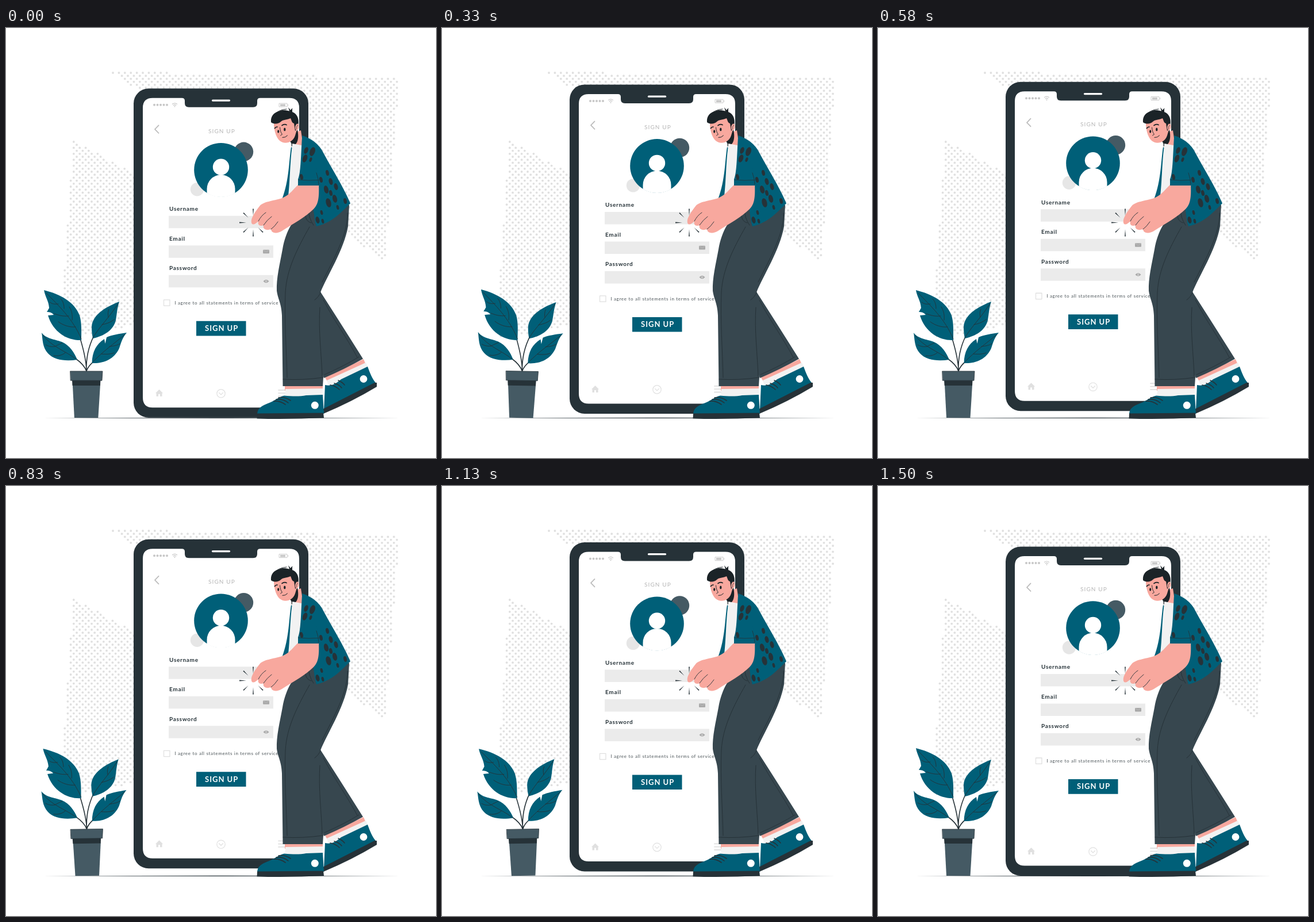
An HTML page with a canvas that plays this animation: 748x748 px, repeating every 1540 ms.

```html
<!DOCTYPE html>
<html lang="en">
<head>
<meta charset="utf-8">
<title>Sign up</title>
<style>
html, body { margin: 0; width: 100%; height: 100%; overflow: hidden; background: #fff; }
canvas { display: block; width: 100vw; height: 100vh; }
</style>
</head>
<body>
<canvas id="stage" width="748" height="748"></canvas>
<script>
const ctx = document.getElementById('stage').getContext('2d');
const LOOP = 1540, STEPS = 37;
const TEAL = '#005f78', DARK = '#263238', SLATE = '#455a64', PANTS = '#37474f',
  SKIN = '#f8a89e', INK = '#1b2327', PALE = '#ebebeb', GREY = '#c7c7c7', SILVER = '#e0e0e0';

function fill(path, color) {
  ctx.fillStyle = color;
  ctx.fill(new Path2D(path));
}
function line(path, color, width = 1) {
  ctx.strokeStyle = color;
  ctx.lineWidth = width;
  ctx.lineCap = ctx.lineJoin = 'round';
  ctx.stroke(new Path2D(path));
}
function oval(x, y, rx, ry, color, turn = 0) {
  ctx.fillStyle = color;
  ctx.beginPath();
  ctx.ellipse(x, y, rx, ry, turn, 0, 2 * Math.PI);
  ctx.fill();
}
const disc = (x, y, r, color) => oval(x, y, r, r, color);
function box(x, y, w, h, color, r = 0) {
  ctx.fillStyle = color;
  ctx.beginPath();
  ctx.roundRect(x, y, w, h, r);
  ctx.fill();
}
function text(str, x, y, font, color, spacing) {
  ctx.font = font + ' Lato, sans-serif';
  ctx.letterSpacing = spacing + 'px';
  ctx.fillStyle = color;
  ctx.fillText(str, x, y);
}

function halftone(shape, x0, y0) {
  const area = new Path2D(shape), gap = 10.4;
  for (let row = 0; row < 100; row++) {
    const y = y0 + row * gap / 2;
    for (let x = x0 + (row % 2) * gap / 2; x < 700; x += gap)
      if (ctx.isPointInPath(area, x, y)) disc(x, y, 1.9, SILVER);
  }
}

function backdrop() {
  halftone('M182 76 L684 86 L660 406 Z', 186, 78);
  halftone('M117 194 L240 264 V514 L94 541 Z', 97, 198);
  fill('M64 678.5 Q374 677.2 686 678.5 Q374 679.3 64 678.5', DARK);
}

function field(label, y, icon) {
  text(label, 284, y - 8.5, '700 10px', DARK, 0.7);
  box(283, y, 182, 21.5, PALE);
  if (icon) icon(452.5, y + 10.7);
}
function mailIcon(x, y) {
  box(x - 5.5, y - 3.3, 11, 6.6, '#a9a9a9', 1);
  line(`M${x - 5} ${y - 2.5} L${x} ${y + 0.5} L${x + 5} ${y - 2.5}`, '#c2c2c2', 0.7);
}
function eyeIcon(x, y) {
  fill(`M${x - 5} ${y} Q${x} ${y - 5.5} ${x + 5} ${y} Q${x} ${y + 5.5} ${x - 5} ${y}`, '#a6a6a6');
  disc(x, y, 1.7, PALE);
  disc(x, y, 0.9, '#999');
}

function statusBar() {
  for (let i = 0; i < 5; i++) disc(258 + i * 5.5, 134, 2, GREY);
  line('M289.5 132.5 Q293.5 129.5 297.5 132.5 M291.2 134.7 Q293.5 133 295.8 134.7', GREY, 1.2);
  disc(293.5, 136.8, 1, GREY);
  line('M475.5 131.3 H489 V137.3 H475.5 Z M490.7 133.3 V135.3', GREY, 0.9);
  box(477, 132.6, 9, 3.6, GREY);
}

function avatar() {
  disc(332.5, 281, 11.7, '#e6e6e6');
  disc(413.5, 215.5, 16.7, SLATE);
  disc(374, 247, 46.8, TEAL);
  ctx.save();
  ctx.beginPath();
  ctx.arc(374, 247, 47.2, 0, 2 * Math.PI);
  ctx.clip();
  disc(374, 242, 14.2, '#fff');
  fill('M349.5 295 V280 A24.5 24.5 0 0 1 398.5 280 V295 Z', '#fff');
  ctx.restore();
}

function phone() {
  box(222, 105.5, 304, 572.5, DARK, 26);
  fill('M255 122 H306 Q311 122 311 127 V131 Q311 138 318 138 H430 Q437 138 437 131 V127 ' +
    'Q437 122 442 122 H493 Q510 122 510 139 V643 Q510 660.5 493 660.5 H255 Q238 660.5 238 643 V139 Q238 122 255 122', '#fff');
  line('M359.5 126.3 H388.5', '#fff', 3.2);
  statusBar();
  line('M265.5 169.5 L259 176.3 L265.5 183', '#bdbdbd', 1.8);
  text('SIGN UP', 352, 182.7, '400 10px', '#b5b5b5', 1.1);
  avatar();
  field('Username', 327, null);
  field('Email', 378.5, mailIcon);
  field('Password', 430, eyeIcon);
  line('M274.5 473 H285 V483.3 H274.5 Z', SILVER, 1.3);
  text('I agree to all statements in terms of service', 293.3, 481, '400 8px', '#4a5357', 0.68);
  box(331, 510, 86.5, 25.7, TEAL);
  text('SIGN UP', 346, 527.3, '700 13px', '#fff', 1);
  fill('M260 635.5 L266.5 629 L273 635.5 H271.5 V641 H268 V637 H265 V641 H261.5 V635.5 Z', SILVER);
  line('M366.8 636 a7.2 7.2 0 1 0 14.4 0 a7.2 7.2 0 1 0 -14.4 0 M370.5 634.5 L374 638 L377.5 634.5', SILVER, 1.2);
  line('M474 630 H486 M474 635.3 H486 M474 640.6 H486', SILVER, 1.8);
}

function plant() {
  line('M140 597 C140 580 135 560 129 540 M140 597 C139 575 143 555 153 535 ' +
    'M140 597 C137 588 131 582 121 575 M140 597 C142 590 146 585 154 579', DARK, 1.6);
  fill('M66 456 C94 463 119 476 128 500 C132 514 131 528 131 543 C108 544 82 530 73 500 L83 499 ' +
    'C80 495 76 494 71 494 L75 487 C74 474 68 468 66 456', TEAL);
  fill('M197 476 C176 484 150 498 149 520 C149 529 150 534 151 540 C170 536 187 526 191 508 C193 497 193 488 197 476', TEAL);
  fill('M62 530 C70 541 84 541 97 546 C111 552 119 565 124 577 C104 580 84 578 73 566 C63 555 64 542 62 530', TEAL);
  fill('M210 530 C197 532 184 534 175 538 L172.5 549 L171 541 C157 550 150 563 149.5 583 C169 584 188 577 197 557 C201 545 203 538 210 530', TEAL);
  line('M70 461 C90 482 116 505 131 541 M101 488 C101 481 99 475 95 471 M115 508 C116 499 114 491 110 485 ' +
    'M91 480 C84 481 80 480 76 477 M109 501 C99 502 92 500 84 497 M121 520 C110 521 99 517 91 511', DARK, 0.9);
  line('M195 479 C181 502 162 520 151 539 M178 503 C177 498 177 493 179 489 M167 516 C177 514 183 511 188 507', DARK, 0.9);
  line('M64 534 C78 554 104 562 122 576 M85 554 C91 551 95 549 98 548 M85 554 C79 555 74 554 69 551 M103 565 C97 570 89 571 83 570', DARK, 0.9);
  line('M207 533 C188 549 169 562 151 581 M180 554 C188 553 194 552 198 549 M166 567 C176 568 183 567 188 565', DARK, 0.9);
  fill('M116 621 H164 L160.5 678 H119 Z', SLATE);
  fill('M115 612.5 H164.5 L164 622 H115.6 Z', DARK);
  fill('M112 597 H168 L167 613.2 H112.6 Z', SLATE);
  line('M112 597 H168 L167 613.2 H112.6 Z', DARK, 0.8);
}

function backLeg() {
  fill('M555 608 L622 576 L627 588 L559 615 Z', SKIN);
  fill('M558 613 L626 582 L632 596 L562 626 Z', '#f2f2f2');
  fill('M555 621 C566 624 575 618 583 611 L629 589 C633 600 637 610 643 617 L553 664 Z', TEAL);
  fill('M551 663 L641 617 L645 617 L645 624 Q602 650 552 671 Z', DARK);
  disc(622, 610.5, 6.4, '#fff');
  line('M564 621 Q572 622 580 629 M571 618 Q579 620 584 626 M578 613 Q585 616 589 621', DARK, 1.5);
  fill('M544 452 L547 459 Q578 507 621 575.5 Q590 593 553 609 L536 560 Z', PANTS);
  line('M554 603 Q590 587 614 572 M552 473 C571 510 594 540 611 573', DARK, 0.9);
}

function frontLeg() {
  fill('M485 620 H551 V631 H485 Z', SKIN);
  fill('M486 628 L551 627 V642 L485 643 Z', '#f2f2f2');
  fill('M484 639.5 C500 641 512 641 522 639 L551 638 L553 671 H437 C438 660 446 657 458 652 C468 648 474 642 484 639.5', TEAL);
  fill('M437 670.5 L552 669.5 L553 678 Q495 681 436.5 679.5 Z', DARK);
  disc(537.3, 656.3, 6.5, '#fff');
  line('M474 643 Q485 641 495 648 M470 646 Q481 644 491 652 M466 649 Q476 648 486 655', DARK, 1.6);
  fill('M526 310 C500 330 487 352 481 385 C476 412 470 436 471 457 C473 472 479 478 480 500 L481.5 623 H551 ' +
    'L552 607 C549 565 544 510 547 460 C558 432 588 386 595 345 L597 308 Z', PANTS);
  line('M528 346 C507 383 488 420 486 460 C484 510 488 560 489 608', DARK, 1);
  line('M482 611 Q516 613 551 608 M547 460 Q544 468 537 473 M546 486 C543 525 549 570 550 606', DARK, 1);
  line('M594 322 C595 358 571 400 550 442 M521 320 C520 332 524 337 531 339 M527 317 Q526 330 535 343', DARK, 1);
}

function torso() {
  fill('M498 201 C496 232 495 262 488 294 L494 291 L510 272 L519 205 Z', '#f2f2f2');
  fill('M496 207 C492 230 493 264 480 298 L491 292 C494 267 494 236 497.5 208 Z', TEAL);
  fill('M515 187 C531 192 545 202 552 217 C567 245 589 280 599 305 C582 322 566 339 540 345 C536 333 536 320 533 306 L512 272 C508 246 520 220 515 187', TEAL);
}

function spots() {
  const upper = [[522, 213, 6], [533, 215, 8], [520, 227, 7], [530, 229, 4]];
  const lower = [[514, 259, 5], [559, 252, 5], [548, 264, 5], [565, 267, 6], [574, 276, 6], [557, 281, 7],
    [565, 287, 5], [572, 297, 7], [561, 304, 8], [590, 301, 5], [577, 312, 4], [549, 321, 4], [542, 334, 6], [551, 336, 4]];
  upper.forEach(([x, y, r]) => oval(x, y, r * 0.55, r, DARK, 0.35));
  lower.forEach(([x, y, r]) => oval(x, y, r * 0.55, r, DARK, -0.25));
}

function head() {
  fill('M497 184 L513 178 L517 205 C510 216 500 215 498 201 Z', SKIN);
  fill('M507 177 C510 191 508 204 496.5 206 C497 202 497 198 491 196 Z', INK);
  fill('M466 160 C465 174 469 190 476 196 C484 203 499 200 503 187 L508 170 L501 151 L477 150 Z', SKIN);
  fill('M461 164 C460 153 466 147 476 144.5 C481 142 488 143 493 144.5 L491 138 L495 143 L498 140 L498 146 ' +
    'C507 149 510 159 508.5 168 L506 176 L503 179 L501 166 C497 165 497 161 495 157 C488 160 482 159 478 163 C474 167 467 168 461 164', INK);
  line('M464 153 Q473 142 488 141 M491 147 Q495 145 498 140', INK, 1);
  oval(506.3, 172.3, 3.2, 5.8, SKIN, 0.15);
  line('M505 176 Q505 170 508 169', DARK, 0.7);
  oval(473.7, 180, 1.6, 2.7, INK);
  oval(484.8, 176.4, 1.7, 2.8, INK);
  line('M467.5 174.5 Q469 172 472 172 M480 169.5 Q484 166.5 488 168.5', INK, 1.7);
  line('M476.5 173 Q477 181 480.5 185 L477.5 187', INK, 0.9);
  line('M481 190.5 Q486 191 489.5 187', INK, 1);
}

function sparkle() {
  for (let i = 1; i < 8; i++) {
    ctx.save();
    ctx.translate(430, 338.5);
    ctx.rotate(i * Math.PI / 4);
    fill('M12 0 L24 -0.9 L24 0.9 Z', DARK);
    ctx.restore();
  }
}

function arm() {
  fill('M511 270 C500 280 493 291 480 296 C464 301 447 302 441 310 C434 319 425 331 427 339 C429 344 434 341 439 336 ' +
    'C437 344 443 345 448 343 C446 350 453 353 461 350 C462 358 472 358 480 353 C500 340 521 329 535 315 C544 306 545 294 544 269 Z', SKIN);
  line('M439 336 Q444 326 452 321 M448 343 Q454 334 462 328 M461 350 Q467 346 473 337', DARK, 0.9);
  fill('M515 190 C524 204 541 230 545 270 L544 274 H508 V263 C513 252 513 221 515 190', TEAL);
  line('M508.5 264 Q526 266 544 264.5 M544 272 Q544 263 540 252', DARK, 0.8);
}

function person() {
  backLeg();
  frontLeg();
  head();
  torso();
  sparkle();
  arm();
  spots();
}

// CSS "ease" curve: cubic-bezier(.25, .1, .25, 1).
function ease(x) {
  let lo = 0, hi = 1, u = 0.5;
  for (let i = 0; i < 20; i++) {
    u = (lo + hi) / 2;
    const bx = 0.75 * u * (1 - u) ** 2 + 0.75 * u * u * (1 - u) + u ** 3;
    if (bx < x) lo = u; else hi = u;
  }
  return 0.3 * u * (1 - u) ** 2 + 3 * u * u * (1 - u) + u ** 3;
}
function sway(p) {
  if (p < 0.25) return ease(p * 4);
  if (p < 0.75) return 1 - 2 * ease((p - 0.25) * 2);
  return ease((p - 0.75) * 4) - 1;
}
function lift(p) {
  const a = 2 * Math.PI * p;
  return 6.45 * (Math.cos(a + 0.13 + 0.2 * Math.sin(a + 0.6)) - 1);
}

function draw(ms) {
  const p = Math.floor(((ms % LOOP) + 5) / LOOP * STEPS) % STEPS / STEPS;
  ctx.fillStyle = '#fff';
  ctx.fillRect(0, 0, 748, 748);
  backdrop();

  ctx.save();
  ctx.translate(0, lift(p));
  phone();
  ctx.restore();

  ctx.save();
  ctx.translate(136, 567);
  ctx.rotate(sway((p + 0.02) % 1) * Math.PI / 180);
  ctx.translate(-136, -567);
  plant();
  ctx.restore();

  person();
}

const start = performance.now();
function tick() {
  draw(performance.now() - start);
  requestAnimationFrame(tick);
}
tick();
</script>
</body>
</html>
```
